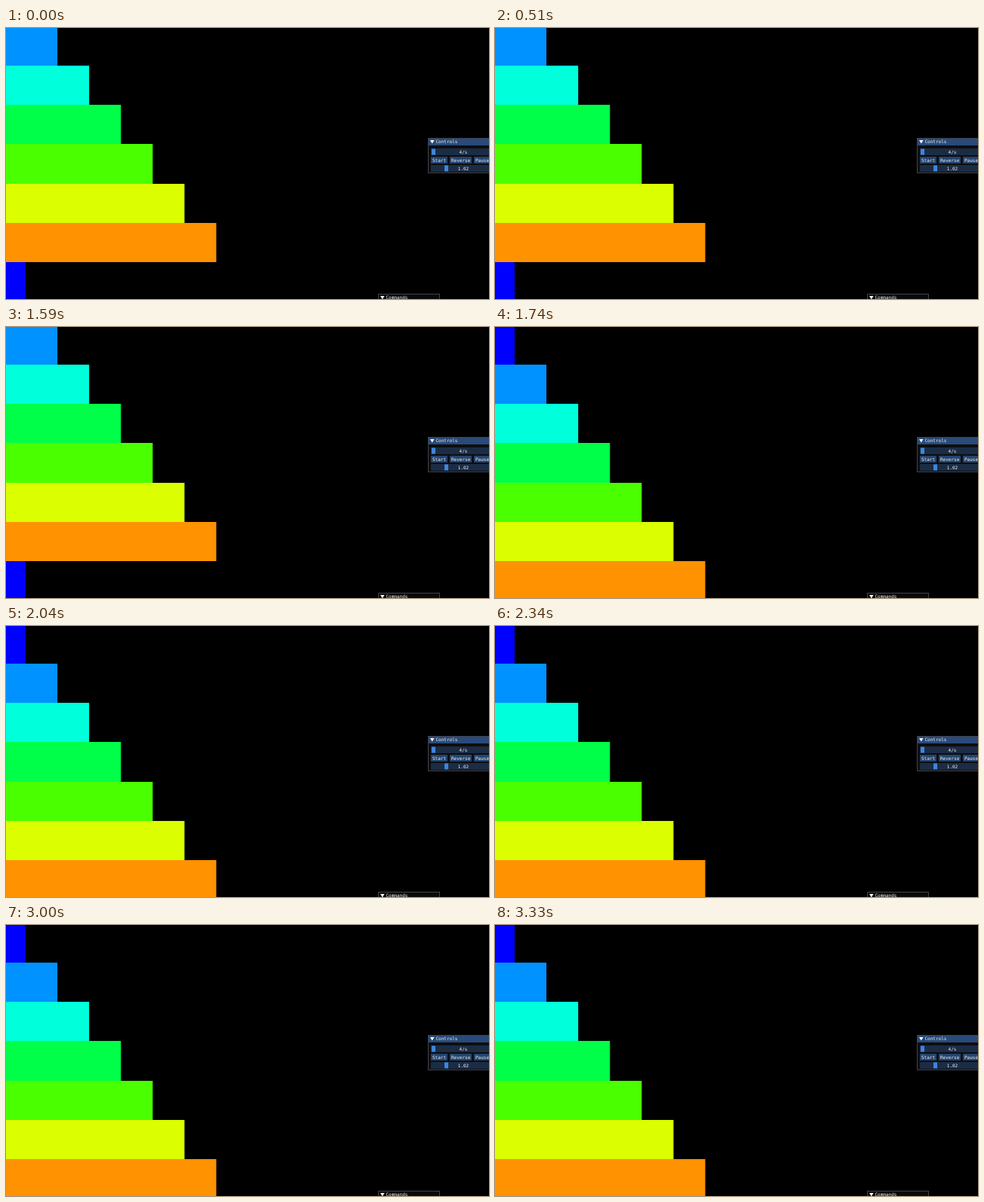
These frames come from a looping animation (640 px wide and 360 px high, 3.36 s). An HTML page with a canvas:

```html
<!DOCTYPE html>
<html lang="en">
<head>
<meta charset="utf-8">
<title>Sorting bars</title>
<style>
  html, body { margin: 0; width: 100%; height: 100%; overflow: hidden; background: #000; }
  canvas { display: block; }
</style>
</head>
<body>
<canvas id="stage" width="640" height="360"></canvas>
<script>
const ctx = document.getElementById('stage').getContext('2d');
const LOOP = 3360, ROTATE_AT = 1620, COUNT = 7;

function rect(color, x, y, w, h) {
  ctx.fillStyle = color;
  ctx.fillRect(x, y, w, h);
}

function label(text, x, y, align = 'left') {
  ctx.fillStyle = '#f4f4f4';
  ctx.textAlign = align;
  ctx.fillText(text, x, y);
}

function drawWindow(title, x, y, w, h, titleColor) {
  rect('#0e0e0f', x, y, w, h);
  rect(titleColor, x, y, w, 10);
  ctx.strokeStyle = '#42424c';
  ctx.lineWidth = 1;
  ctx.strokeRect(x + 0.5, y + 0.5, w - 1, h - 1);
  ctx.fillStyle = '#fff';
  ctx.beginPath();
  ctx.moveTo(x + 3, y + 3);
  ctx.lineTo(x + 8.5, y + 3);
  ctx.lineTo(x + 5.75, y + 7.5);
  ctx.fill();
  label(title, x + 10.5, y + 7);
}

function slider(text, y, grabX) {
  rect('#1b2c45', 563, y, 86, 9);
  rect('#3d85e0', grabX, y + 0.5, 5, 8);
  label(text, 606, y + 6.5, 'center');
}

function button(text, x, w) {
  rect('#23446f', x, 171, w, 9);
  label(text, x + 2, 177.5);
}

function drawBars(shift) {
  const top = row => Math.round(-2 + 52.14 * row);
  for (let row = 0; row < COUNT; row++) {
    const value = (row + shift) % COUNT;
    rect(`hsl(${240 * (1 - value / COUNT)}, 100%, 50%)`,
      0, top(row), 26 + 42.1 * value, top(row + 1) - top(row));
  }
}

function draw() {
  const time = performance.now() % LOOP;
  rect('#000', 0, 0, 640, 360);
  drawBars(time < ROTATE_AT ? 1 : 0);

  ctx.font = '6px "DejaVu Sans Mono", monospace';
  drawWindow('Controls', 559, 146, 94, 47, '#294a7a');
  slider('4/s', 160, 564);
  button('Start', 563, 22);
  button('Reverse', 588, 29);
  button('Pause', 620, 22);
  slider('1.02', 182, 581);
  drawWindow('Commands', 493, 353, 82, 60, '#0a0a0a');
  requestAnimationFrame(draw);
}
draw();
</script>
</body>
</html>
```
